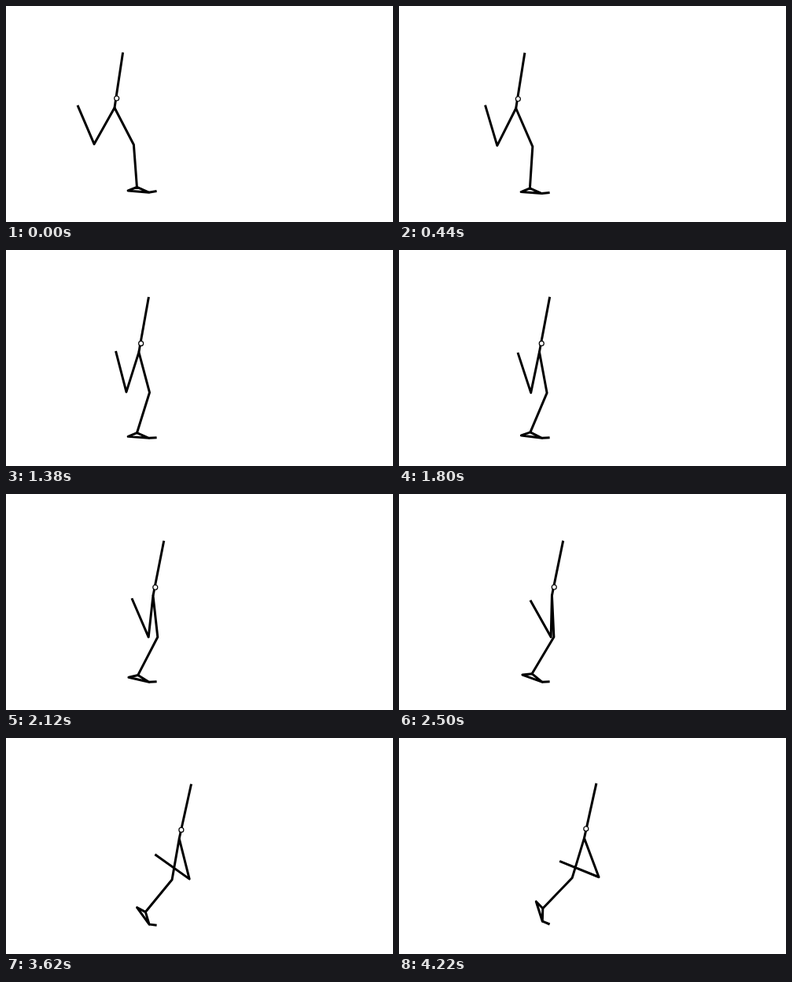
Write an HTML page with a canvas that moves like this. It is 492x276 px and loops after 4240 ms.

```html
<!DOCTYPE html>
<html lang="en">
<head>
<meta charset="utf-8">
<title>Walking stick figure</title>
<style>
html, body { margin: 0; width: 100%; height: 100%; overflow: hidden; background: #fff; }
canvas { display: block; }
</style>
</head>
<body>
<canvas id="stage" width="492" height="276"></canvas>
<script>
const ctx = document.getElementById('stage').getContext('2d');
const LOOP = 4240;
const LAST_POSE = 91;
const THIGH = 53.2, SHANK = 53.9, INSTEP = 16.5, REAR = 12.2;

// Poses come in bursts of three: two short ones, then a hold.
function poseAt(ms) {
  const t = ms + 20;
  const burst = Math.floor(t / 140);
  return 3 * burst + Math.min(2, Math.floor((t - burst * 140) / 20)) - 1;
}

// Polynomial in s, lowest power first.
const poly = (s, ...c) => c.reduceRight((sum, k) => sum * s + k, 0);

// Point at a distance and angle in degrees, 0 down and 90 forward.
function from(p, length, degrees) {
  const a = degrees * Math.PI / 180;
  return { x: p.x + length * Math.sin(a), y: p.y + length * Math.cos(a) };
}

// Stride progress s runs from 0 to 1.
function figure(s) {
  const landing = (1 - s) ** 8;
  const head = { x: poly(s, 148.6, 102.3, 3.5, -3.5), y: poly(s, 59.4, 3, -4.5) };
  const mass = { x: poly(s, 140.7, 97.1), y: poly(s, 118, 8, -11.8, 1.8) };
  const hip = { x: poly(s, 138, 97.5, -2.5, 2.5), y: 132 - 4.1 * s - 2 * landing };

  // Swinging leg
  const kneeA = from(hip, THIGH, poly(s, -29.2, 13.9, 89.6, -53.9));
  const footA = from(kneeA, SHANK, poly(s, -157, -77, 155, 26.8, -60));

  // Standing leg, with the foot settling and then rolling off the ground
  const kneeB = from(hip, THIGH, poly(s, 27.3, -32.7, -23.7, 12.3));
  const ball = { x: 181.5 + 0.8 * s * s, y: 240.4 - 2.2 * landing - 6.2 * s ** 6 };
  const toe = { x: 191.6, y: 239.8 - 3.2 * landing - 1.8 * s ** 8 };
  const roll = poly(s, 65.9, -8.1, 153.4, -463, 250);
  const ankle = from(ball, -INSTEP, roll);
  const heel = from(ankle, REAR, roll - 134);

  return { head, mass, hip, kneeA, footA, kneeB, ankle, heel, ball, toe };
}

function limb(points, closed) {
  ctx.beginPath();
  for (const p of points) ctx.lineTo(p.x, p.y);
  if (closed) ctx.closePath();
  ctx.stroke();
}

function draw(pose) {
  const f = figure(pose / LAST_POSE);
  ctx.fillStyle = '#fff';
  ctx.fillRect(0, 0, 492, 276);
  ctx.strokeStyle = '#000';
  ctx.lineJoin = 'round';
  ctx.lineWidth = 3;
  limb([f.head, f.hip]);
  limb([f.footA, f.kneeA, f.hip, f.kneeB, f.ankle]);
  limb([f.ankle, f.heel, f.ball], true);
  limb([f.ball, f.toe]);

  ctx.lineWidth = 1.2;
  ctx.beginPath();
  ctx.arc(f.mass.x, f.mass.y, 3, 0, 2 * Math.PI);
  ctx.fill();
  ctx.stroke();
}

const start = performance.now();
function tick() {
  draw(poseAt((performance.now() - start) % LOOP));
  requestAnimationFrame(tick);
}
tick();
</script>
</body>
</html>
```
